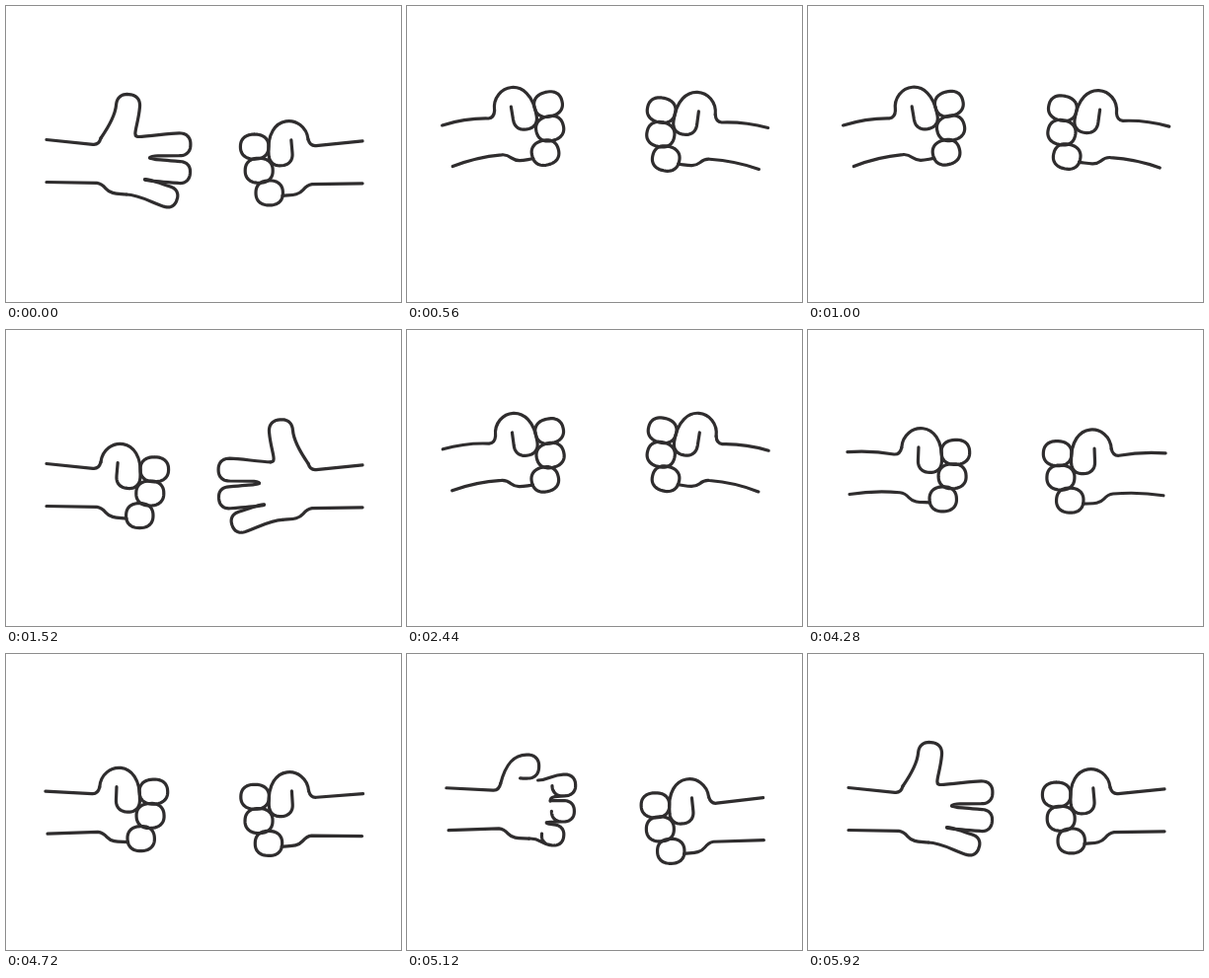
Animation, 400 px wide and 300 px high, one loop 6 s. Source, as an HTML page with a canvas:

```html
<!DOCTYPE html>
<html lang="en">
<head>
<meta charset="utf-8">
<title>Rock paper scissors</title>
<style>
  html, body { margin: 0; width: 100%; height: 100%; overflow: hidden; background: #fff; }
  canvas { display: block; width: 400px; height: 300px; }
</style>
</head>
<body>
<canvas id="stage" width="400" height="300"></canvas>
<script>
const ctx = document.getElementById('stage').getContext('2d');
const ROUND = 2000, LOOP = 3 * ROUND, STEP = 40;

// Gestures of the left and right hand at the end of each round.
const THROWS = [['rock', 'paper'], ['scissors', 'scissors'], ['paper', 'rock']];
const opensThumb = gesture => +(gesture === 'paper');
const opensFinger = (gesture, i) => +(gesture === 'paper' || gesture === 'scissors' && i < 2);

const lerp = (a, b, k) => a + (b - a) * k;
const mix = (p, q, k) => p.map((v, i) => lerp(v, q[i], k));
const along = (p, dir, d) => [p[0] + dir[0] * d, p[1] + dir[1] * d];
const bell = k => 4 * k * (1 - k);
const curve = (...points) => ctx.bezierCurveTo(...points.flat());
const ease = (t, a, b) => {
  const k = Math.min(1, Math.max(0, (t - a) / (b - a)));
  return (1 - Math.cos(Math.PI * k)) / 2;
};

// Two pumps, then a strike that overshoots; the tilt lags behind the lift.
const liftAt = t => 5 * ease(t, 0, 120)
  - 20 * (ease(t, 120, 335) - ease(t, 570, 750) + ease(t, 750, 920))
  + 25 * ease(t, 1040, 1180) - 10 * ease(t, 1180, 1400);
const tiltAt = t => ease(t, 0, 160)
  - 15.5 * (ease(t, 160, 520) - 0.85 * (ease(t, 540, 770) - ease(t, 770, 970)))
  + 16.5 * ease(t, 1000, 1190) - 2 * ease(t, 1190, 1420);

// Slightly squared arc, continuing the current path.
function arc([x, y], rx, ry, turn, from, to) {
  const soft = v => Math.sign(v) * Math.abs(v) ** 0.86;
  const cos = Math.cos(turn), sin = Math.sin(turn);
  for (let n = 0; n <= 24; n++) {
    const a = lerp(from, to, n / 24);
    const u = rx * soft(Math.cos(a)), v = ry * soft(Math.sin(a));
    ctx.lineTo(x + u * cos - v * sin, y + u * sin + v * cos);
  }
}

function drawArm(bend) {
  ctx.beginPath();
  ctx.moveTo(41, 135.5);
  ctx.quadraticCurveTo(66, 138 - bend, 88, 140.3);
  ctx.quadraticCurveTo(94, 141, 96, 134);
  ctx.moveTo(41, 178.5);
  ctx.quadraticCurveTo(66, 178.8 - bend, 92, 179.3);
  ctx.quadraticCurveTo(97, 180, 101, 185);
  curve([106, 191], [114, 190], [122, 191]);
  ctx.stroke();
}

const THUMB_BASE = [134, 132.5];

// The thumb points up when open and swings clockwise to point down in the fist.
function drawThumb(k) {
  const fold = 1 - k, r = 12;
  const angle = lerp(95, -85, k) * Math.PI / 180;
  const dir = [Math.cos(angle), Math.sin(angle)], normal = [dir[1], -dir[0]];
  const center = along(mix([124, 148.5], [123.5, 101.5], k), [0, -1], 7 * bell(k));
  const outer = along(center, normal, r), inner = along(center, normal, -r);
  const end = mix(along(inner, dir, -lerp(13, 6, bell(k))), THUMB_BASE, k ** 3);
  const leave = along(inner, dir, -(5 + 14 * k * k));
  ctx.beginPath();
  ctx.moveTo(96, 134);
  curve([99 + 6 * k, 108 + 13 * k], along(outer, dir, -(10 + 34 * fold ** 3)), outer);
  arc(center, r, r, angle, -Math.PI / 2, Math.PI / 2);
  curve(leave, mix(leave, [127, 132.5], k ** 4), end);
  ctx.stroke();
}

// Gap j between neighbouring fingers; the outermost two are plain joints.
const isWeb = j => j === 1 || j === 2;
const baseAt = j => isWeb(j) ? [150.5 - 5 * j, 132.2 + 21.8 * j] : j ? [122, 191] : THUMB_BASE;

// Base point j and the control points leading from it to a fingertip edge.
function side(edge, j, dir, k) {
  const reach = Math.min(1, k * (isWeb(j) ? 2 : 6));
  const base = mix(edge, baseAt(j), reach);
  if (!isWeb(j)) return [base, along(base, [1, 0], 12 * reach), along(edge, dir, -12 * reach)];
  const length = (edge[0] - base[0]) * dir[0] + (edge[1] - base[1]) * dir[1];
  return [base, along(edge, dir, -length), along(edge, dir, 4 * reach - length)];
}

function drawFinger(i, k) {
  const folded = [150.3 - 1.5 * i - 3 * i * i, 141.3 + 25 * i - 0.8 * i * i];
  const straight = [175.5 - 6.25 * i * (i - 1), 140.3 + 30 * i - 1.8 * i * i];
  const angle = 0.08 * i * i * k, dir = [Math.cos(angle), Math.sin(angle)], normal = [dir[1], -dir[0]];
  const center = along(mix(folded, straight, k), [-3, -2], bell(k));
  const rx = lerp(14.3 - 0.3 * i, 11.4 - 0.4 * i, k) - bell(k);
  const ry = lerp(12.5, 11.4 - 0.4 * i, k) - bell(k);
  const top = along(center, normal, ry), bottom = along(center, normal, -ry);
  const upper = side(top, i, dir, k), lower = side(bottom, i + 1, dir, k);
  ctx.beginPath();
  ctx.moveTo(...upper[0]);
  curve(upper[1], upper[2], top);
  arc(center, rx, ry, angle, -Math.PI / 2, Math.PI / 2);
  curve(lower[2], lower[1], lower[0]);
  // The curled part closes the fingertip into a knuckle.
  if (k < 0.99) {
    ctx.moveTo(...bottom);
    arc(center, rx, ry, angle, Math.PI / 2, Math.PI * (1.5 - k));
  }
  ctx.stroke();
}

function drawHand(t, before, after) {
  const lift = liftAt(t), closing = 1 - ease(t, 0, 200), opening = ease(t, 1050, 1190);
  const openness = test => test(before) * closing + test(after) * opening;
  ctx.translate(40, 157 + lift);
  ctx.rotate(tiltAt(t) * Math.PI / 180);
  ctx.translate(-40, -157);
  drawArm(Math.max(0, -lift / 4));
  drawThumb(openness(opensThumb));
  for (let i = 0; i < 3; i++) drawFinger(i, openness(gesture => opensFinger(gesture, i)));
}

function draw(now) {
  const time = Math.floor(now % LOOP / STEP) * STEP;
  const round = Math.floor(time / ROUND), t = time % ROUND;
  const before = THROWS[(round + 2) % 3], after = THROWS[round];
  ctx.setTransform(1, 0, 0, 1, 0, 0);
  ctx.fillStyle = '#fff';
  ctx.fillRect(0, 0, 400, 300);
  ctx.strokeStyle = '#2f2d2e';
  ctx.lineWidth = 3.2;
  ctx.lineCap = ctx.lineJoin = 'round';
  drawHand(t, before[0], after[0]);
  // The right hand is mirrored and strikes slightly earlier.
  ctx.setTransform(-1, 0, 0, 1, 402, 1.3);
  drawHand(t + 40 * ease(t, 300, 500), before[1], after[1]);
}

const begin = performance.now();
function tick() {
  draw(performance.now() - begin);
  requestAnimationFrame(tick);
}
tick();
</script>
</body>
</html>
```
